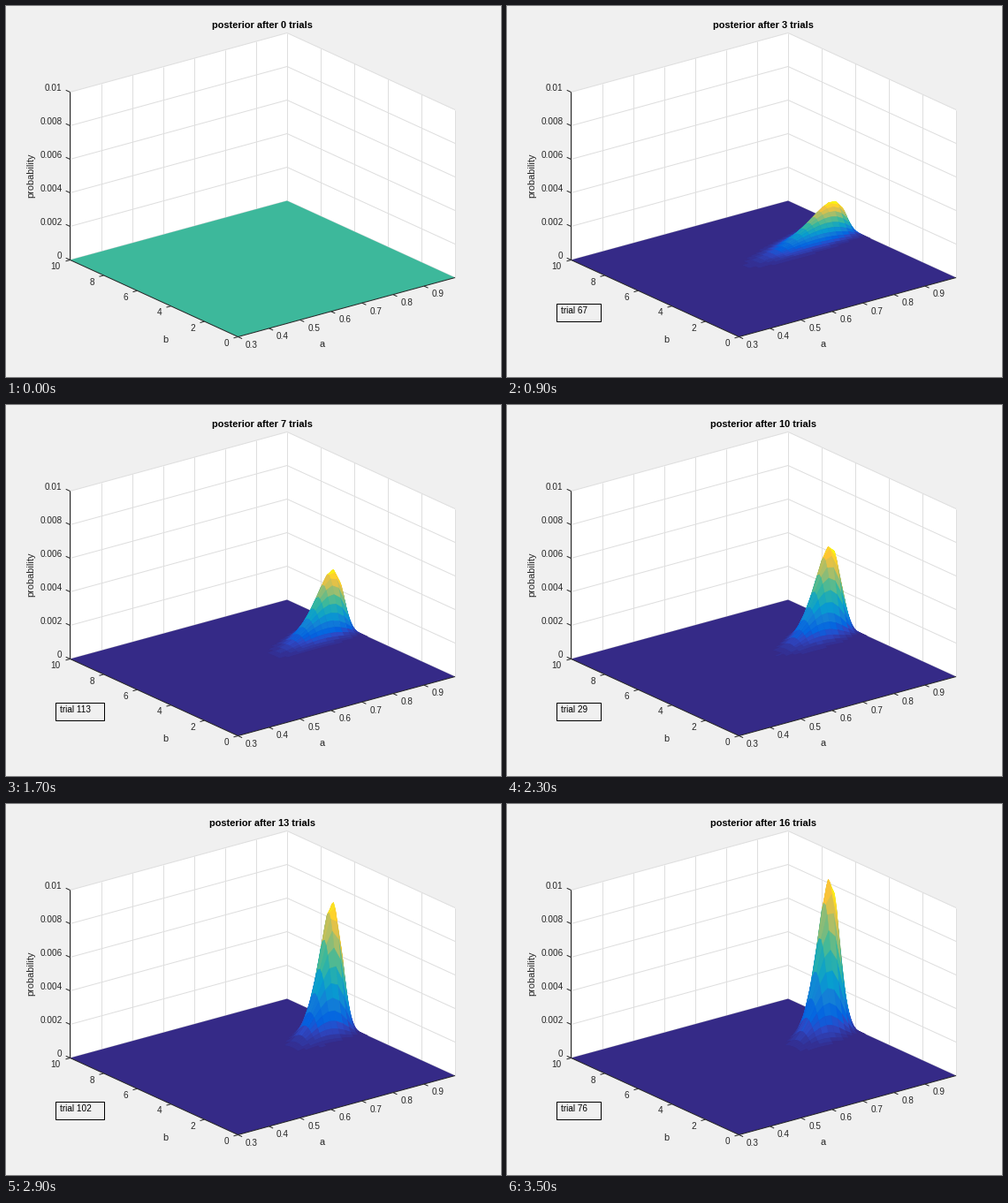
Recreate the animation shown at these times as a matplotlib script. Size 560 by 420 pixels, loop 3.7 s.

```python
import matplotlib.pyplot as plt
import numpy as np
from matplotlib.animation import FuncAnimation
from matplotlib.collections import LineCollection, PolyCollection
from matplotlib.colors import LinearSegmentedColormap
from matplotlib.patches import Polygon, Rectangle

W, H, DPI = 560, 420, 100
INK, PAPER = "#262626", "#f0f0f0"
TOP = 0.01
plt.rcParams["font.family"] = "Liberation Sans"

PARULA = LinearSegmentedColormap.from_list("parula", [
    (0, "#352a87"), (0.08, "#2c4ac7"), (0.13, "#0363e1"), (0.24, "#1481d6"),
    (0.33, "#079dd0"), (0.50, "#38b89d"), (0.68, "#a5be6b"),
    (0.87, "#fec337"), (1, "#f9fb0e")], N=64)

# Trial shown in the note at each step
TRIALS = [112, 64, 67, 121, 48, 125, 113, 141, 137, 29, 118, 105, 102, 51, 34, 76]

# Path of the summit on the stage: steps done, x, y
STEP, SUMMIT_X, SUMMIT_Y = np.array([
    (1, 382, 238), (3, 367, 222), (7, 369, 187),
    (10, 365, 160), (13, 369, 112), (16, 365, 85)]).T


def project(a, b, z=0.0):
    """Data coordinates to stage pixels."""
    u = (a - 0.3) / 0.7
    return 262.5 + 245.5 * u - 19 * b, 374.5 - 67 * u - 8.7 * b - 19000 * z


A, B = np.meshgrid(np.linspace(0.3, 1, 36), np.linspace(0, 10, 101), indexing="ij")


def posterior(n):
    """Beta-shaped in a, normal in b, along a ridge that steepens with n."""
    x, y = np.interp(n, STEP, SUMMIT_X), np.interp(n, STEP, SUMMIT_Y)
    b0 = 6.5 - 0.8 * np.exp(1 - n)
    a0 = 0.3 + 0.7 * (x - project(0.3, b0)[0]) / 245.5
    peak = (project(a0, b0)[1] - y) / 19000
    a = np.minimum(A, 0.9995)
    log_a = a0 * np.log(a / a0) + (1 - a0) * np.log((1 - a) / (1 - a0))
    ridge = b0 + (2.3 + 0.2 * n) * (a - a0)
    z = np.exp((9 + 1.6 * n) * log_a - ((B - ridge) / 0.4) ** 2 / 2)
    return peak * z / z.max()


def corners(g):
    return np.stack([g[:-1, :-1], g[1:, :-1], g[1:, 1:], g[:-1, 1:]], axis=-1)


def faces(n):
    """Visible cells from back to front, with their flat shades."""
    z = posterior(n)
    x, y = project(A, B, z)
    quads = np.stack([corners(x), corners(y)], axis=-1)[::-1, ::-1]
    shade = (z[:-1, :-1] / z.max())[::-1, ::-1]
    seen = (corners(z).max(axis=-1) > 0.003 * z.max())[::-1, ::-1]
    return quads[seen], PARULA(shade[seen])


fig = plt.figure(figsize=(W / DPI, H / DPI), dpi=DPI, facecolor=PAPER)
ax = fig.add_axes([0, 0, 1, 1])
ax.set(xlim=(0, W), ylim=(H, 0))
ax.axis("off")


def text(x, y, s, px=10, **kw):
    kw = {"ha": "center", "va": "baseline", "color": INK, **kw}
    return ax.text(x, y, s, fontsize=px * 72 / DPI, **kw)


def lines(segs, color, z):
    ax.add_collection(LineCollection(segs, colors=color, linewidths=0.72, zorder=z))


def path(*points):
    return [project(*p) for p in points]


# Walls and their grid
walls = path((0.3, 10, 0), (0.3, 10, TOP), (1, 10, TOP),
             (1, 0, TOP), (1, 0, 0), (1, 10, 0))
ax.add_patch(Polygon(walls, fc="white", ec="none", zorder=1))
a_ticks = np.arange(3, 10) / 10
b_ticks = np.arange(0, 11, 2)
z_ticks = np.arange(0, 11, 2) / 1000
grid = [path((a, 10, 0), (a, 10, TOP)) for a in [*a_ticks, 1]]
grid += [path((1, b, 0), (1, b, TOP)) for b in b_ticks[:-1]]
grid += [path((0.3, 10, z), (1, 10, z), (1, 0, z)) for z in z_ticks]
lines(grid, "#dedede", 2)

floor = Polygon(path((0.3, 0), (1, 0), (1, 10), (0.3, 10)), ec="none", zorder=3)
ax.add_patch(floor)
surface = PolyCollection([], edgecolors="face", linewidths=0.45, zorder=4)
ax.add_collection(surface)

# Axis lines, ticks and labels
marks = [path((0.3, 10, TOP), (0.3, 10), (0.3, 0), (1, 0))]


def tick(point, value, mark, label, ha):
    x, y = project(*point)
    marks.append([(x, y), (x + mark[0], y + mark[1])])
    text(x + label[0], y + label[1], f"{value:g}", ha=ha)


for a in a_ticks:
    tick((a, 0), a, (4.6, 2.1), (8.5, 12.3), "left")
for b in b_ticks:
    tick((0.3, b), b, (-5, 1.4), (-10.5, 10.7), "right")
for z in z_ticks:
    tick((0.3, 10, z), z, (-4.8, -2.2), (-9, -1), "right")
lines(marks, INK, 5)
text(358, 385.5, "a", 11)
text(180, 381, "b", 11)
text(28.5, 192, "probability", 11, rotation=90, va="center")

title = text(289.5, 25, "", 11, weight="bold", color="black")
box = Rectangle((55.5, 336.5), 55, 20, fc=PAPER, ec="black", lw=0.72, zorder=5)
ax.add_patch(box)
note = text(61, 347.5, "", ha="left", color="black", zorder=6)


def draw(i):
    n = 0 if i < 5 else 1 + (i - 5) // 2
    title.set_text(f"posterior after {n} trials")
    floor.set_facecolor(PARULA(0.0 if n else 0.5))
    for part in (surface, box, note):
        part.set_visible(n > 0)
    if n:
        quads, shades = faces(n)
        surface.set_verts(quads)
        surface.set_facecolor(shades)
        label = f"trial {TRIALS[n - 1]}"
        note.set_text(label)
        box.set_width(10 + 5 * len(label))
    return surface, floor, title, box, note


anim = FuncAnimation(fig, draw, frames=37, interval=100, repeat=True,
                     repeat_delay=0, blit=False)
plt.show()
```
